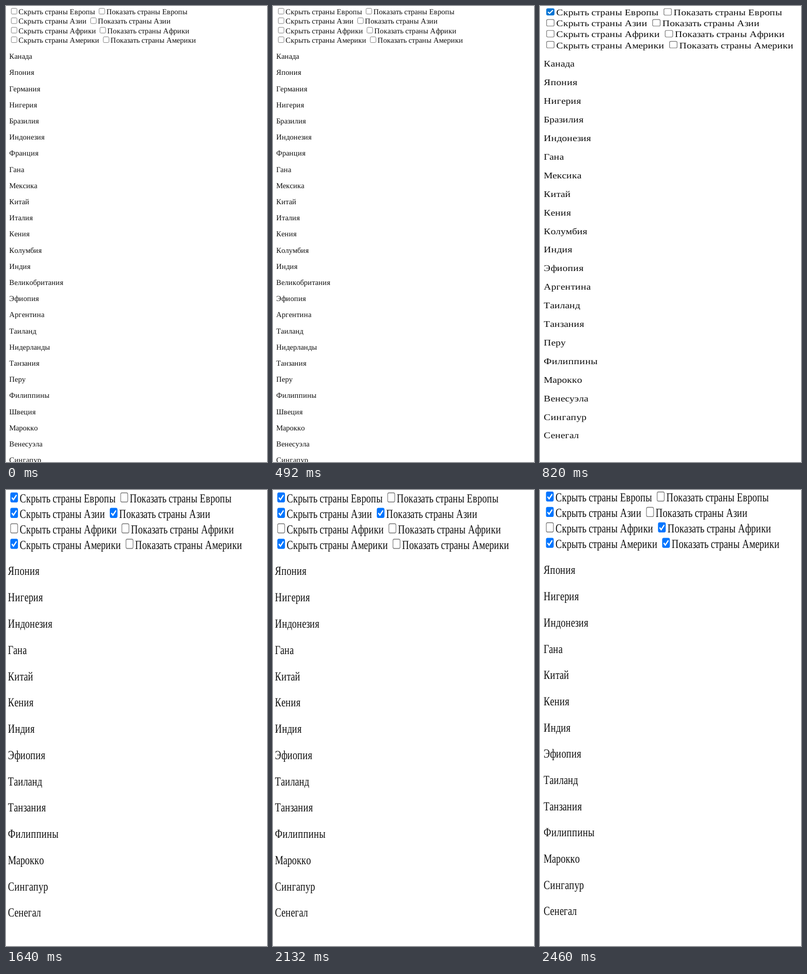
An HTML page for the animation above (3280 ms loop, 505 by 881 pixels).

```html
<!DOCTYPE html>
<html lang="ru">
<head>
<meta charset="utf-8">
<title>Страны</title>
<style>
  html, body { margin: 0; width: 100%; height: 100%; overflow: hidden; background: #fff; }
  svg { display: block; width: 505px; height: 881px; }
  text { font: 16px "Liberation Serif", "Times New Roman", serif; text-rendering: geometricPrecision; white-space: pre; }
</style>
</head>
<body>
<svg viewBox="0 0 505 881"></svg>
<script>
const STEP = 820;
const regions = ['Европы', 'Азии', 'Африки', 'Америки'];
const countries = ('Канада Япония Германия Нигерия Бразилия Индонезия Франция Гана Мексика ' +
  'Китай Италия Кения Колумбия Индия Великобритания Эфиопия Аргентина Таиланд Нидерланды ' +
  'Танзания Перу Филиппины Швеция Марокко Венесуэла Сингапур Сенегал').split(' ');
const europe = 'Германия Франция Италия Великобритания Нидерланды Швеция'.split(' ');
const america = 'Канада Бразилия Мексика Колумбия Аргентина Перу Венесуэла'.split(' ');

// view: scale x, scale y, left edge, first baseline; on: ticked boxes, two per row
const scenes = [
  { view: [.908, .9176, 6.2, 16], on: [], hidden: [] },
  { view: [1.214, 1.0559, 7.3, 18.2], on: [0], hidden: europe, tint: '#0074d4' },
  { view: [1.139, 1.4932, 3.8, 24.1], on: [0, 2, 3, 6], hidden: [...europe, ...america] },
  { view: [1.147, 1.491, 7, 22.3], on: [0, 2, 5, 6, 7], hidden: [...europe, ...america] }
];

const svg = document.querySelector('svg');
const pen = document.createElement('canvas').getContext('2d');
pen.font = '16px "Liberation Serif", "Times New Roman", serif';

function add(parent, tag, attrs) {
  const el = document.createElementNS('http://www.w3.org/2000/svg', tag);
  for (const key in attrs) el.setAttribute(key, attrs[key]);
  return parent.appendChild(el);
}

// Whole-pixel advances, like a screen font; returns the end of the line
function write(parent, str, x, y) {
  const xs = [];
  for (const ch of str) {
    xs.push(x);
    x += Math.round(pen.measureText(ch).width);
  }
  add(parent, 'text', { x: xs.join(' '), y, fill: '#0c0c0c' }).textContent = str;
  return x;
}

function checkbox(parent, x, y, on, tint = '#0075ff') {
  add(parent, 'rect', {
    x: x + .5, y: y - 12.5, width: 12, height: 12, rx: 2,
    fill: on ? tint : '#fff', stroke: on ? tint : '#767676'
  });
  if (on) add(parent, 'path', {
    d: `M${x + 2.6} ${y - 6.3}l2.7 2.7l5.2 -6`,
    fill: 'none', stroke: '#fff', 'stroke-width': 1.9
  });
}

function build({ view: [sx, sy, left, top], on, hidden, tint }) {
  const g = add(svg, 'g', { transform: `matrix(${sx} 0 0 ${sy} ${left} ${top})` });
  regions.forEach((region, row) => {
    let x = 0;
    ['Скрыть', 'Показать'].forEach((verb, col) => {
      checkbox(g, x + 4, row * 20, on.includes(row * 2 + col), tint);
      x = write(g, `${verb} страны ${region}`, x + 20, row * 20) + 4;
    });
  });
  countries.filter(name => !hidden.includes(name))
    .forEach((name, i) => write(g, name, 0, 94 + i * 34));
  return g;
}

const layers = scenes.map(build);

function draw() {
  const now = Math.floor(performance.now() / STEP) % layers.length;
  layers.forEach((g, i) => g.setAttribute('visibility', i === now ? 'visible' : 'hidden'));
  requestAnimationFrame(draw);
}
draw();
</script>
</body>
</html>
```
